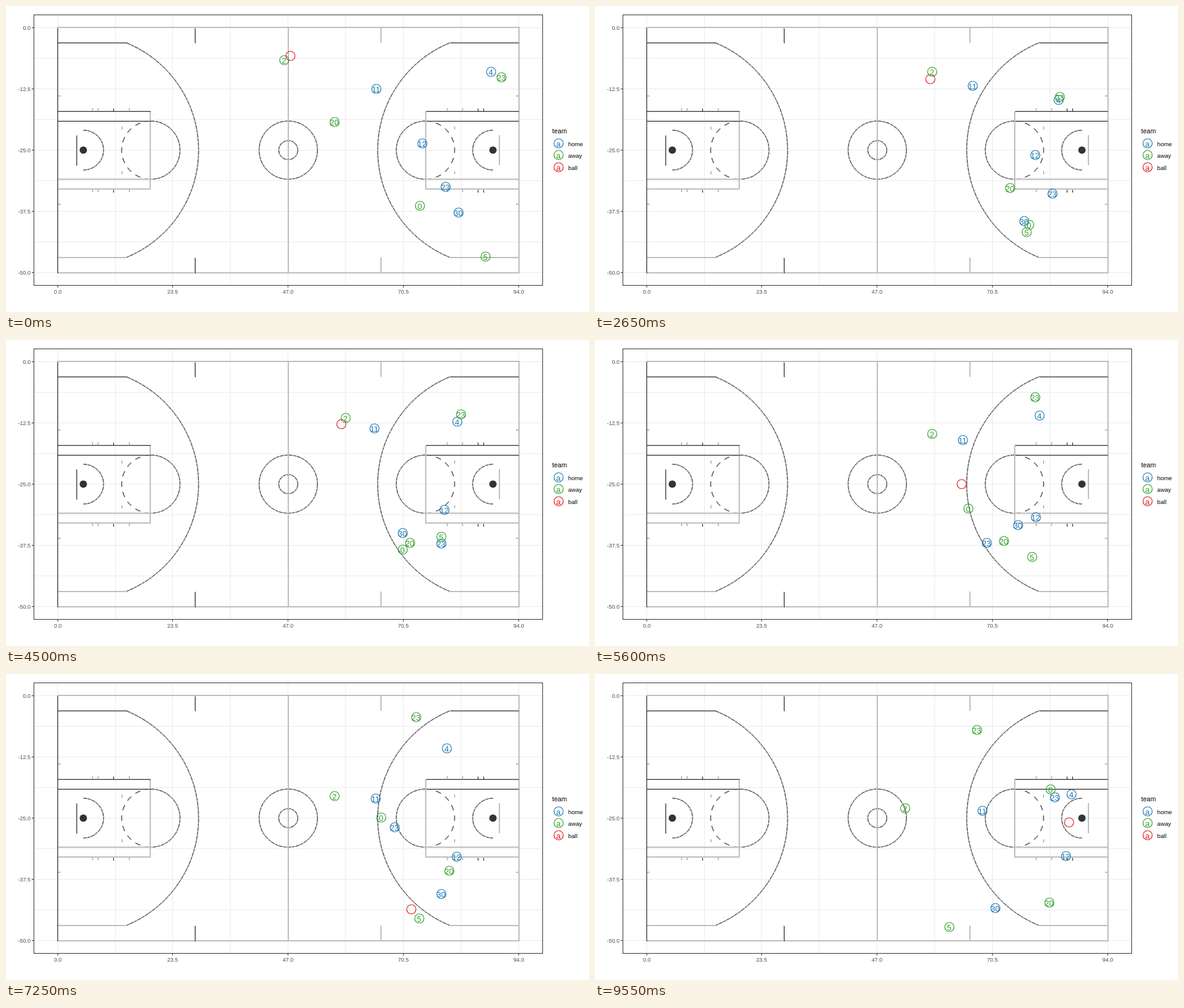
Write an HTML page that moves like this. It is 950 by 500 pixels and loops after 9600 ms.

```html
<!DOCTYPE html>
<html lang="en">
<head>
<meta charset="utf-8">
<title>Court tracking</title>
<style>
  html, body { margin: 0; width: 100%; height: 100%; overflow: hidden; background: #fff; }
  svg { display: block; }
  path, circle, rect { fill: none; }
  text { font-family: "Liberation Sans", Arial, sans-serif; }
  .crisp { shape-rendering: crispEdges; }
  .grid { stroke: #ebebeb; }
  .axis { stroke: #333; }
  .axis-text { font-size: 9px; fill: #4d4d4d; }
  .grey { stroke: #bebebe; stroke-width: 2; }
  .dark { stroke: #333; }
  .arc-dark { stroke: #333; stroke-dasharray: 6 2 4 2; }
  .hoop { fill: #333; }
  .ring { stroke-width: 1.2; }
  .label { font-size: 13px; text-anchor: middle; }
</style>
</head>
<body>
<svg width="950" height="500" viewBox="0 0 950 500">
  <defs>
    <path id="arcs" d="M197 60.5A189.5 189.5 0 0 1 197 410.5
      M236 188A47.5 47.5 0 0 1 236 283 M126 203A33 32.5 0 0 1 126 268"/>
    <path id="dashes" d="M236 188A47.5 47.5 0 0 0 236 283" stroke-dasharray="9 8.5"/>
    <g id="half">
      <use href="#arcs" class="grey"/>
      <use href="#arcs" class="arc-dark"/>
      <use href="#dashes" class="grey"/>
      <use href="#dashes" class="dark"/>
      <circle class="hoop" cx="126" cy="235.5" r="6"/>
    </g>
    <g id="middle">
      <circle cx="460" cy="235.5" r="47.5"/>
      <circle cx="460" cy="235.5" r="15.5"/>
    </g>
    <path id="strong" d="M84 35V436 M308 36V60M308 411V436 M84 60H197M723 60H835
      M84 172H235M684 172H835 M84 188H235M684 188H835 M115 211V260
      M175 167V171M769 167V171M778 167V171M175 300V304M769 300V304M778 300V304"/>
  </defs>
  <g id="axes" class="crisp"></g>
  <rect class="axis crisp" x="45.5" y="14.5" width="829" height="442"/>
  <g id="ticks"></g>

  <use href="#half"/>
  <use href="#half" transform="matrix(-1 0 0 1 919.5 0)"/>
  <use href="#middle" class="grey"/>
  <use href="#middle" class="arc-dark"/>
  <path class="grey crisp" d="M84 35H836V436H84 M460 36V436 M611 36V60M611 411V436
    M84 411H197M723 411H836 M235 172V299H84 M84 283H240 M684 172V299H836 M680 283H836
    M804 211V260 M84 147H89M84 324H89M831 147H836M831 324H836
    M189 197V202M189 270V275M731 197V202M731 270V275
    M141 167V171M150 167V171M201 167V171M719 167V171M744 167V171
    M141 300V304M150 300V304M201 300V304M719 300V304M744 300V304"/>
  <use href="#strong" class="grey crisp"/>
  <use href="#strong" class="dark crisp" transform="translate(.5 .5)"/>

  <text x="890" y="208" font-size="10.8">team</text>
  <g id="legend"></g>
  <g id="rings"></g>
  <g id="labels"></g>
</svg>
<script>
const LOOP = 9600, STEP = 50, LAST = LOOP - STEP;
const COLORS = { home: "#1f78b4", away: "#33a02c", ball: "#e31a1c" };
const $ = id => document.getElementById(id);

function add(parent, tag, attrs, text = "") {
  const el = document.createElementNS("http://www.w3.org/2000/svg", tag);
  for (const key in attrs) el.setAttribute(key, attrs[key]);
  el.textContent = text;
  return parent.appendChild(el);
}

// Axes: five major lines each way, minor lines halfway between
for (let i = 0; i < 9; i++) {
  const x = Math.floor(84.1 + i * 93.9) + 0.5, y = 35.5 + i * 50;
  add($("axes"), "path", { class: "grid", d: `M${x} 15V456M46 ${y}H874` });
  if (i % 2) continue;
  add($("axes"), "path", { class: "axis", d: `M${x} 457V460M42 ${y}H45` });
  add($("ticks"), "text", { class: "axis-text", x, y: 470, "text-anchor": "middle" }, (i * 11.75).toFixed(1));
  add($("ticks"), "text", { class: "axis-text", x: 40, y: y + 3.5, "text-anchor": "end" },
    (i ? "-" : "") + (i * 6.25).toFixed(1));
}

Object.keys(COLORS).forEach((team, i) => {
  const y = Math.floor(224 + i * 19.5), color = COLORS[team];
  add($("legend"), "circle", { class: "ring", cx: 900.5, cy: y + 0.5, r: 7.5, stroke: color });
  add($("legend"), "text", { class: "label", x: 900, y: y + 5.5, fill: color }, "a");
  add($("legend"), "text", { x: 916, y: y + 5, "font-size": 9.7 }, team);
});

// Smooth curve through points that are evenly spaced in time
function along(points, time) {
  const progress = time / LAST * (points.length - 1);
  const i = Math.min(Math.floor(progress), points.length - 2), u = progress - i;
  const a = points[i], b = points[i + 1];
  const before = points[i - 1], after = points[i + 2];
  return [0, 1].map(k => {
    const move = b[k] - a[k];
    const slopeA = before ? (b[k] - before[k]) / 2 : move;
    const slopeB = after ? (after[k] - a[k]) / 2 : move;
    return a[k] + move * u * u * (3 - 2 * u) + u * (1 - u) * (slopeA * (1 - u) - slopeB * u);
  });
}

const markers = [];
function addMarker(team, number, at) {
  const ring = add($("rings"), "circle", { class: "ring", cx: 0.5, cy: 0.5, r: 7.5, stroke: COLORS[team] });
  const label = add($("labels"), "text", { class: "label", y: 6, fill: COLORS[team] }, number);
  markers.push({ ring, label, at });
  return at;
}
const player = (team, number, ...points) => addMarker(team, number, time => along(points, time));

player("home", 4, [790, 107], [758, 153], [733, 131], [717, 120], [776, 196]);
player("home", 11, [603, 135], [619, 129], [603, 136], [599, 166], [605, 210], [631, 223]);
player("home", 12, [678, 224], [716, 239], [714, 281], [733, 298], [767, 297]);
player("home", 23, [716, 295], [736, 296], [744, 325], [634, 328], [643, 233], [749, 201]);
player("home", 30, [737, 337], [738, 360], [636, 328], [692, 303], [707, 371], [652, 382]);
player("away", 20, [535, 189], [672, 272], [658, 326], [668, 328], [732, 324], [740, 373]);
player("away", 23, [807, 116], [762, 148], [752, 136], [714, 91], [658, 69], [622, 91]);
const guard = player("away", 2, [453, 88], [544, 105], [552, 132], [536, 197], [505, 219]);
const cutter = player("away", 0, [674, 326], [718, 341], [671, 370], [606, 270], [622, 226], [742, 188]);
const shooter = player("away", 5, [781, 409], [766, 402], [680, 352], [714, 322], [700, 388], [646, 403], [577, 413]);

// The ball stays at arm's length from its holder and flies straight between stops
const held = (holder, angle) => time => {
  const [x, y] = holder(time), a = angle(time);
  return [x + 12 * Math.cos(a), y + 12 * Math.sin(a)];
};
const stops = [
  { from: 0, until: 5150, at: held(guard, time => 2.2 - 2.85 * Math.exp(-time / 1300)) },
  { from: 5780, until: 6560, at: held(cutter, () => 0) },
  { from: 7290, until: 7970, at: held(shooter, () => -2.5) },
  { from: 9115, until: 9115, at: () => [794, 236] },
  { from: LAST, until: LOOP, at: () => [772, 242] },
];

addMarker("ball", "", time => {
  const i = stops.findIndex(stop => time < stop.until);
  const next = stops[i], previous = stops[i - 1];
  if (time >= next.from) return next.at(time);
  const start = previous.at(previous.until), end = next.at(next.from);
  const u = (time - previous.until) / (next.from - previous.until);
  return start.map((value, k) => value + (end[k] - value) * u);
});

function draw() {
  const time = Math.floor(performance.now() % LOOP / STEP) * STEP;
  for (const { ring, label, at } of markers) {
    const place = `translate(${at(time).map(Math.round)})`;
    ring.setAttribute("transform", place);
    label.setAttribute("transform", place);
  }
  requestAnimationFrame(draw);
}
draw();
</script>
</body>
</html>
```
